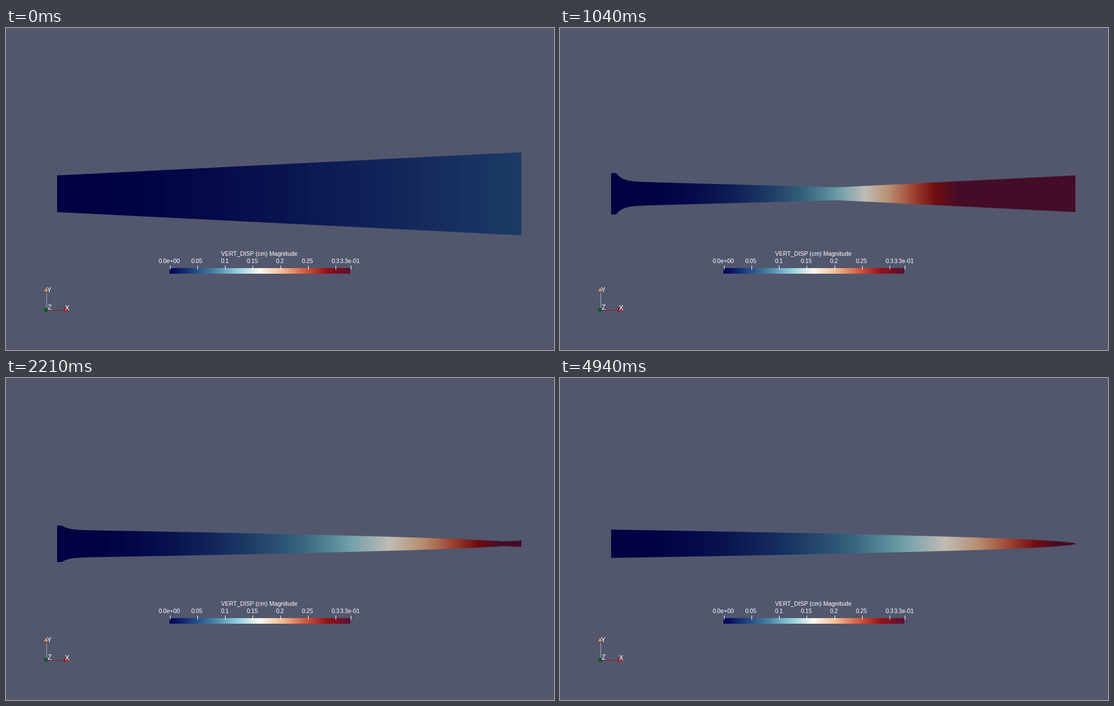
Animation of 976x574 px, one loop 5.33 s. Source, as a matplotlib script:

```python
import matplotlib.pyplot as plt
import numpy as np
from matplotlib.animation import FuncAnimation
from matplotlib.colors import LinearSegmentedColormap
from matplotlib.patches import Circle, Polygon

W, H, DPI = 976, 574, 100
STEP_MS, FRAMES, LAST_STEP = 130, 41, 37
LEFT, RIGHT, MID = 91, 918, 295.5
SLOPE = 0.05        # flare of the untouched wedge
SHADE = 0.76        # lighting on the beam surface
STIFFNESS = 2.8     # bending stiffness grows with this power of thickness
FINAL_TIP = 1.1     # last tip displacement relative to the colour range
FONT = "Liberation Sans"

cmap = LinearSegmentedColormap.from_list("warm", [
    "#000059", "#204380", "#4985a6", "#92d1e0", "#fcf8ee",
    "#f2bb94", "#d45a42", "#961016", "#5c1134"])

# Design history: step, wedge tip, root height, taper power, clamp flange
DESIGNS = np.array([
    (0, 74, 33, 1, 0),
    (2, 68.8, 28, 1, 0),
    (5, 44.6, 24, 1, 10),
    (7, 32.7, 22.5, 1, 14.5),
    (11, 23.5, 27.5, 0.87, 15.5),
    (16, 5.8, 25, 0.55, 7.5),
    (25, 1.6, 25.2, 0.53, 4.5),
    (28, 1.2, 25.2, 0.53, 0),
])

xs = np.arange(LEFT, RIGHT + 1)
u = (xs - LEFT) / (RIGHT - LEFT)
flange_decay = np.exp(-np.clip(xs - 100, 0, None) / 11)


def half_height(step):
    """Tapered arm meeting the remains of the wedge, plus the root flange."""
    tip, root, power, flange = [
        np.interp(step, DESIGNS[:, 0], track) for track in DESIGNS.T[1:]]
    wedge = tip - SLOPE * (RIGHT - xs)
    return np.maximum(wedge, root * (1 - u) ** power) + flange * flange_decay


def deflection(half):
    """Cantilever with a tip load: curvature is moment over stiffness."""
    curvature = (1 - u) / half ** STIFFNESS
    return np.cumsum(np.cumsum(curvature))


GAIN = FINAL_TIP / deflection(half_height(LAST_STEP))[-1]

fig = plt.figure(figsize=(W / DPI, H / DPI), dpi=DPI, facecolor="#52576e")
ax = fig.add_axes([0, 0, 1, 1])
ax.axis("off")


def label(x, y, text, px=10.6):
    ax.text(x, y, text, color="white", family=FONT, size=px * 72 / DPI,
            ha="center", va="baseline", zorder=6)


def line(x, y, color, width=1.0):
    ax.plot(x, y, color=color, lw=width * 72 / DPI, zorder=4,
            solid_capstyle="butt")


def cone(points, color):
    ax.add_patch(Polygon(points, fc=color, ec="none", zorder=5))


def strip(values, x0, x1, y0, y1):
    return ax.imshow(cmap(values)[None, :, :3], extent=[x0, x1, y1, y0],
                     aspect="auto", interpolation="nearest", zorder=2)


def draw_legend():
    x0, x1, top = 291, 613, 0.3267
    strip(np.linspace(0, 1, x1 - x0), x0, x1, 428, 438)
    label(451.5, 406, "VERT_DISP (cm) Magnitude")
    ticks = [(i * 0.05, f"{i * 0.05:.2g}") for i in range(1, 7)]
    for value, text in [(0, "0.0e+00"), *ticks, (top, "3.3e-01")]:
        x = x0 + (x1 - x0) * value / top
        label(x, 419, text)
        x = np.floor(x) + 0.5
        line([x, x], [423, 430], "white")


def draw_triad():
    line([71.5, 71.5], [470, 502], "#a8a4bc")
    line([72, 104], [502.5, 502.5], "#a01c24")
    cone([(71.5, 462.5), (68, 470), (75, 470)], "#dc9a66")
    line([68.5, 74.5], [470, 470], "#2a2420")
    cone([(112, 502.5), (104, 499), (104, 506)], "#c01818")
    line([104, 104], [499, 506], "#500808", 1.5)
    ax.add_patch(Circle((71.5, 502.3), 3.6, fc="#0a5a18", ec="none", zorder=5))
    label(76.8, 471, "Y", 12)
    label(77.6, 502, "Z", 12)
    label(109, 503, "X", 12)


draw_legend()
draw_triad()

beam = strip(0 * u, LEFT, RIGHT, 200, 400)
outline = Polygon([(0, 0), (1, 0), (1, 1)], fc="none", ec="none")
ax.add_patch(outline)
ax.set_xlim(0, W)
ax.set_ylim(H, 0)


def update(frame):
    half = half_height(np.clip(frame - 1, 0, LAST_STEP))
    top = np.column_stack([xs, MID - half])
    bottom = np.column_stack([xs, MID + half])
    outline.set_xy(np.concatenate([top, bottom[::-1]]))
    level = np.clip(GAIN * deflection(half), 0, 1)
    beam.set_data(cmap(level)[None, :, :3] * SHADE)
    beam.set_clip_path(outline)
    return beam, outline


anim = FuncAnimation(fig, update, frames=FRAMES, interval=STEP_MS,
                     repeat=True, repeat_delay=0)
plt.show()
```
